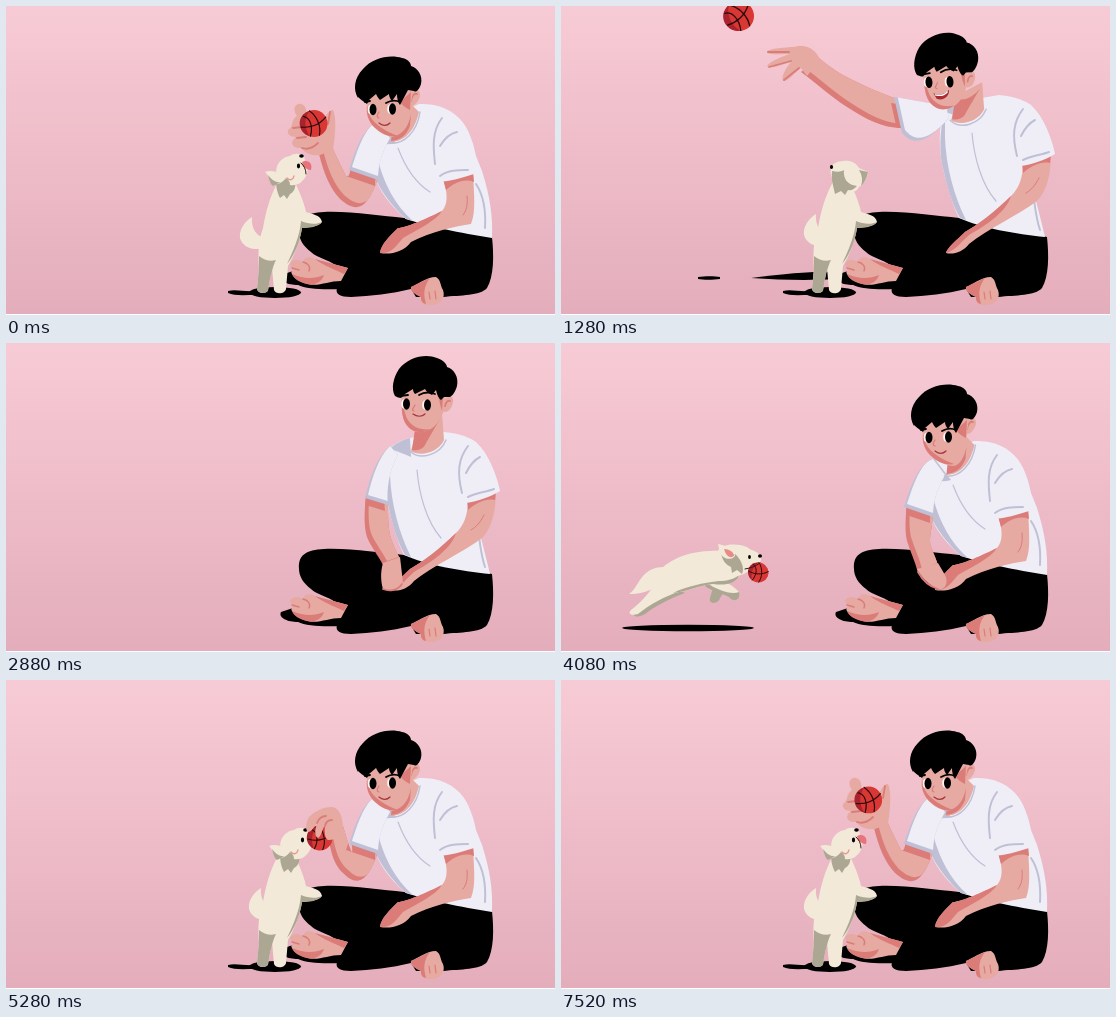
An HTML page with a canvas that plays this animation: 549x309 px, repeating every 7600 ms.

```html
<!DOCTYPE html>
<html lang="en">
<head>
<meta charset="utf-8">
<title>Fetch</title>
<style>
html, body { margin: 0; width: 100%; height: 100%; overflow: hidden; background: #fff }
canvas { display: block }
</style>
</head>
<body>
<canvas width="549" height="309"></canvas>
<script>
const LOOP = 7600, STEP = 80;
const SKIN = '#e6aaa2', BLUSH = '#db7c79', SHIRT = '#efeef7', FOLD = '#bfc0d5';
const FUR = '#f3e9d8', FUR_SHADE = '#aca793', INK = '#000', RED = '#d93733';
const c = document.querySelector('canvas').getContext('2d');

const fill = (path, color) => { c.fillStyle = color; c.fill(new Path2D(path)); };
const line = (path, color, width) => {
  c.strokeStyle = color; c.lineWidth = width; c.lineCap = 'round'; c.stroke(new Path2D(path));
};
const oval = (x, y, rx, ry, color) => {
  c.fillStyle = color; c.beginPath(); c.ellipse(x, y, rx, ry, 0, 0, 7); c.fill();
};
const within = (path, draw) => {
  c.save(); c.clip(new Path2D(path)); draw(); c.restore();
};
// Draws with the pivot (px, py) moved by (dx, dy) and turned; flip -1 mirrors.
const at = (dx, dy, draw, turn = 0, px = 0, py = 0, flip = 1) => {
  c.save();
  c.translate(px + dx, py + dy); c.rotate(turn); c.scale(flip, 1); c.translate(-px, -py);
  draw();
  c.restore();
};
// A shape lit from the upper right.
const lit = (path, color, shade, depth) => {
  fill(path, shade);
  within(path, () => at(depth, -depth, () => fill(path, color)));
};

const NUM = /-?[\d.]+/g;
const mix = (a, b, k) => {
  const to = b.match(NUM);
  let i = 0;
  return a.replace(NUM, v => (+v + (to[i++] - v) * k).toFixed(2));
};
const span = (t, keys) => {
  let i = 0;
  while (i < keys.length - 2 && t >= keys[i + 1][0]) i++;
  const [a, b] = [keys[i], keys[i + 1]];
  const k = Math.min(1, Math.max(0, (t - a[0]) / (b[0] - a[0])));
  return [a[1], b[1], k];
};
const smooth = k => k * k * (3 - 2 * k);
const track = (t, keys, ease = smooth) => {
  const [a, b, k] = span(t, keys);
  return a + (b - a) * ease(k);
};

// Throwing arm: sleeve, arm outline and hand for each pose.
const bentSleeve = 'M372 116 C356 122 349 146 343 164 L372 174 C372 162 374 150 384 132Z';
const POSES = {
  hold: {
    sleeve: bentSleeve,
    arm: 'M345 160 C344 170 342 172 340 170 C336 162 331 152 327 143 L313 148 C318 168 324 182 334 193 C348 205 360 208 372 172Z',
    hand: 'M327 144 C329 132 331 112 327 104 C322 104 318 112 316 120 L300 112 C302 102 298 97 292 98 C287 100 288 106 291 110 C285 114 287 120 284 122 C279 126 283 131 290 131 C283 136 286 143 295 142 C300 148 306 150 314 149Z',
    crease: 'M287 122 L296 121 M291 132 L300 131 M296 142 C302 144 308 141 312 137 M322 118 L324 106'
  },
  wind: {
    sleeve: 'M384 97 C368 99 355 92 345 85 L335 118 C352 136 365 138 385 112Z',
    arm: 'M347 87 C340 84 336 80 338 74 C342 62 346 52 352 42 L336 36 C326 52 318 66 316 80 C316 98 326 110 338 116Z'
  },
  cast: {
    sleeve: 'M384 97 C368 99 350 93 333 91 L341 127 C352 140 365 138 388 112Z',
    arm: 'M336 93 C322 88 308 82 298 77 C282 70 270 62 258 52 L240 66 C256 78 272 92 286 101 C304 113 322 122 340 122Z',
    hand: 'M259 54 C256 45 248 39 238 40 C228 42 215 41 206 45 C206 50 218 48 228 48 C218 52 208 56 206 60 C210 64 222 58 230 56 C225 62 220 70 222 75 C227 76 234 66 240 62 L246 70Z',
    crease: 'M207 46 L228 46 M208 61 L230 55 M223 74 L238 62'
  },
  lap: {
    sleeve: 'M384 103 C370 115 364 135 359 155 L382 162 C380 145 384 125 392 112Z',
    arm: 'M360 153 C358 170 358 185 361 194 C365 204 372 212 377 222 L394 216 C390 208 386 200 384 192 C382 180 382 172 382 160Z',
    hand: 'M377 220 C374 230 375 240 377 246 C384 249 394 246 397 240 L394 214Z',
    crease: 'M377 246 C384 249 392 247 396 241'
  },
  low: {
    sleeve: bentSleeve,
    arm: 'M346 160 C344 178 344 190 346 198 C349 208 354 218 357 230 L377 222 C374 212 370 206 369 199 C369 190 371 186 372 172Z',
    hand: 'M356 226 C360 234 368 242 376 246 C384 248 388 240 384 232 L377 220Z',
    crease: 'M357 229 C362 238 370 244 377 246'
  },
  grip: {
    sleeve: bentSleeve,
    arm: 'M345 160 C347 172 347 174 345 171 C342 163 340 156 337 146 L323 160 C325 174 329 186 337 193 C348 204 360 208 372 172Z',
    hand: 'M337 148 C337 138 334 128 326 127 C316 127 308 132 303 137 C300 142 299 150 302 152 C306 152 308 146 311 144 C309 150 308 156 312 158 C316 156 316 148 319 146 C318 152 319 160 323 160 C330 160 336 156 337 148Z',
    crease: 'M311 143 C313 138 317 136 320 136 M319 146 C320 141 324 140 326 140'
  }
};
Object.assign(POSES.wind, {
  hand: POSES.hold.hand, crease: POSES.hold.crease, home: POSES.hold.arm
});
const ARM_KEYS = [[0, 'hold'], [400, 'hold'], [720, 'wind'], [1040, 'wind'], [1200, 'cast'],
  [1600, 'cast'], [2080, 'lap'], [3680, 'lap'], [4080, 'low'], [4480, 'low'], [4880, 'grip'],
  [6480, 'grip'], [7120, 'hold'], [LOOP, 'hold']];
const wrist = arm => {
  const n = arm.match(NUM).map(Number);
  return [(n[12] + n[14]) / 2, (n[13] + n[15]) / 2];
};

function ball(x, y, turn = 0, r = 15) {
  at(x, y, () => {
    c.scale(r / 15, r / 15);
    oval(0, 0, 15, 15, RED);
    fill('M-5 -14 C-20 -10 -19 10 -5 14 C-11 4 -11 -6 -5 -14Z', '#a8232e');
    line('M-14 4 C-5 5 6 2 13 -7 M-5 -14 C4 -8 8 4 6 13 M-12 -8 C-4 -7 -1 4 -4 14', '#25080b', 1.3);
  }, turn);
}

function legs() {
  fill('M275 269 C272 275 282 279 292 279 C300 283 318 284 334 283 L340 270 L290 264Z', INK);
  fill('M293 226 C292 212 300 207 318 206 C345 205 375 210 398 212 L486 231 C488 250 488 270 481 282 C474 290 455 289 437 291 L410 291 L405 283 C385 288 365 290 345 291 C334 291 329 288 331 282 L337 266 C330 255 312 253 305 246 C297 240 293 233 293 226Z', INK);
  fill('M284 258 C286 253 292 253 297 256 C298 251 304 250 309 253 C318 257 330 258 342 262 L335 275 C322 275 312 281 302 278 C293 276 288 272 286 268 C284 265 288 264 286 262Z', SKIN);
  fill('M309 253 L342 262 L338 268 C328 263 318 260 309 253Z M286 268 C298 273 308 273 318 269 C316 276 308 280 301 278 C293 276 288 273 286 268Z', BLUSH);
  line('M286 262 L293 264 M297 256 C302 257 305 261 303 265', BLUSH, 1.4);
  fill('M405 281 C411 279 420 271 430 271 C435 274 434 279 437 284 C440 292 434 299 426 299 C417 300 414 296 415 291 C408 288 404 284 405 281Z', SKIN);
  fill('M405 281 L424 272 C418 280 417 287 420 298 C414 297 415 291 415 291 C408 288 405 285 405 281Z', BLUSH);
  line('M423 286 L424 293 M429 285 L430 293', BLUSH, 1.2);
}

function torso(lean) {
  const m = (up, down) => mix(up, down, lean);
  fill(m('M404 95 C395 97 388 101 383 106 C377 122 378 145 382 162 C386 180 392 200 398 212 C420 222 455 228 484 231 C479 210 474 190 468 170 L462 158 C475 156 487 152 492 146 C490 132 484 112 470 99 C460 92 448 90 438 89Z',
    'M372 116 C366 119 363 122 360 127 C358 142 362 160 370 174 C376 190 390 205 400 213 C420 220 455 227 486 232 C487 210 484 190 476 165 L470 150 C470 150 468 140 466 135 C462 122 455 110 440 103 C432 99 424 98 413 98Z'), SHIRT);
  fill(m('M384 105 C378 125 378 150 383 166 C387 185 393 202 399 212 L405 214 C393 190 385 160 384 132Z',
    'M366 120 C361 140 364 160 371 176 C378 190 390 204 400 213 L407 215 C390 200 377 178 370 146Z'), FOLD);
  fill(m('M404 95 C396 97 388 101 384 106 C390 108 396 110 405 114Z',
    'M373 115 C367 118 362 122 360 130 C368 138 380 140 390 137 L384 128Z'), FOLD);
  line(m('M411 127 C413 150 420 178 435 195', 'M392 142 C398 158 408 176 424 186'), FOLD, 1.2);
  line(m('M470 176 C474 195 474 210 479 224', 'M470 178 C478 190 480 205 479 222'), FOLD, 2);
}

function restingArm(lean) {
  const m = (up, down) => mix(up, down, lean);
  fill(m('M462 156 C462 172 458 182 450 190 C435 205 415 220 404 226 C396 235 386 242 385 247 C392 249 402 246 408 238 C426 223 458 209 476 195 C487 184 490 165 490 147Z',
    'M437 173 C442 188 442 198 436 205 C422 212 400 222 392 222 C384 230 375 238 374 247 C384 249 398 246 405 236 C424 226 450 220 465 218 C470 205 468 190 467 166Z'), SKIN);
  fill(m('M461 156 L490 147 L489 157 C480 155 470 160 462 167Z', 'M437 173 L467 166 L468 176 C458 172 448 177 440 184Z'), BLUSH);
  fill(m('M450 190 C435 205 415 220 404 226 C394 235 386 242 385 247 C394 245 400 236 408 229 C426 219 446 205 450 190Z',
    'M436 205 C422 212 400 222 392 222 C384 230 375 238 374 247 C386 248 390 240 397 232 C412 223 430 215 436 205Z'), BLUSH);
  line(m('M478 172 C474 180 470 184 465 187', 'M461 190 C462 200 460 205 457 209'), BLUSH, 1);
  fill(m('M465 98 C455 115 455 140 460 160 C472 158 484 154 494 148 C490 130 482 108 465 98Z',
    'M440 104 C426 120 427 150 433 176 C444 175 456 172 468 168 C468 150 462 118 440 104Z'), SHIRT);
  line(m('M462 103 C452 116 451 130 456 150 M460 130 C465 120 470 116 474 114 M462 154 C470 150 480 149 488 146',
    'M436 112 C426 125 427 140 429 158 M434 140 C440 130 446 127 451 126 M434 170 C442 164 452 164 462 164'), FOLD, 2);
}

function head(t, lean) {
  const m = (up, down) => mix(up, down, lean);
  const dx = track(t, [[320, 0], [720, -8], [1040, -8], [1200, -33], [1600, -33], [2080, 0], [3680, 0], [4080, 1], [4400, 0]]);
  const dy = track(t, [[320, 0], [720, 4], [1040, 4], [1200, 14], [1600, 14], [2080, 0], [3680, 0], [4080, -9], [4400, 0]]);
  const turn = track(t, [[1040, 0], [1200, -.07], [1600, -.07], [2080, 0]]);
  at(dx * .45, dy * .45, () => {
    fill(m('M409 84 C410 94 406 102 405 108 C414 114 432 110 438 97 L436 70Z', 'M386 126 C388 132 386 134 384 136 C396 136 408 128 413 106 L405 98Z'), SKIN);
    fill(m('M409 86 C418 90 428 84 434 76 L420 100 C418 106 412 108 406 107Z', 'M386 126 C396 130 402 122 405 108 L404 120 C400 130 394 134 385 135Z'), BLUSH);
    line(m('M404 108 C414 118 434 112 440 97', 'M383 137 C398 139 411 126 414 106'), FOLD, 1.5);
  });
  at(dx, dy, () => {
    fill(m('M437 58 C442 51 448 52 447 59 C446 66 441 71 436 68Z', 'M403 88 C408 81 415 83 414 90 C412 97 407 102 402 99Z'), SKIN);
    line(m('M439 63 C440 58 443 57 444 58', 'M405 95 C406 89 409 87 411 88'), BLUSH, 1.8);
    fill(m('M396 50 C394 60 396 72 399 80 C403 86 409 90 416 89 C426 88 433 80 437 70 L440 50 L415 38Z', 'M361 88 C360 98 361 108 364 116 C369 124 378 130 387 131 C398 128 404 118 404 106 L407 84 L380 75Z'), SKIN);
    fill(m('M396 60 C395 72 398 82 406 87 C412 90 418 90 424 86 C412 88 402 82 399 70Z', 'M361 100 C360 108 362 114 368 121 C376 128 384 132 392 130 C380 126 368 118 364 110Z'), BLUSH);
    fill(m('M433 52 L437 54 L436 68 C434 62 433 58 433 52Z', 'M394 96 L405 86 L404 104 C400 102 397 100 394 96Z'), BLUSH);
    fill(m('M389 53 C385 46 387 35 393 26 C402 14 420 10 431 15 C438 17 441 22 441 24 C448 26 453 34 451 43 C449 50 446 53 444 54 L438 54 L435 57 C432 55 431 51 430 47 L426 52 C422 50 420 48 419 46 L409 51 C408 50 407 48 407 46 L399 51 L395 55 C393 55 391 54 389 53Z',
      'M352 92 C347 84 348 72 357 63 C366 52 384 48 396 52 C403 53 405 58 405 60 C412 62 417 70 415 78 C413 84 410 87 408 85 L402 84 L394 99 C392 97 391 92 391 88 L386 95 C384 93 383 90 383 88 L374 94 C372 92 371 90 370 88 L363 94 L361 98 C357 95 354 93 352 91Z'), INK);
    line(m('M394 53 L402 52 M413 52 C418 49 424 49 429 51', 'M359 96 L364 95 M380 97 C385 94 390 94 394 96'), INK, 1.8);
    const lid = track(t, [[2880, 1], [2960, .35], [3040, .1], [3120, 1]]);
    for (const [ux, uy, x, y] of [[400.5, 61, 367, 103.5], [421.5, 62, 386.5, 103]]) {
      const ex = ux + (x - ux) * lean, ey = uy + (y - uy) * lean;
      oval(ex - 2, ey, 3.3, 4.8 * lid, '#fff5ee');
      oval(ex, ey, 3.5, 5.8 * lid, INK);
    }
    line(m('M409 62 C407 66 405 67 408 68', 'M373 106 C371 109 370 111 373 112'), BLUSH, 1.2);
    if (t >= 1120 && t < 1760) {
      fill('M404 72 C410 76 416 74 420 70 C420 77 413 81 407 78Z', '#a92c34');
      line('M406 74 C412 76 416 74 418 72', '#fff', 1.3);
    } else line(m('M407 71 C411 74 416 74 419 71', 'M373 117 C377 120 381 120 384 117'), '#a5343c', 1.2);
  }, turn, 418, 55);
}

function dogHead(biting) {
  fill('M271 171 C269 179 271 186 274 192 L278 189 L281 193 L284 188 C289 186 291 178 288 172Z', FUR_SHADE);
  fill('M271 170 C268 160 275 151 284 150 C288 147 294 147 297 150 C300 152 299 156 297 158 C301 160 303 166 300 170 C296 177 291 180 284 179 C284 172 277 170 271 170Z', FUR);
  fill('M259 166 C266 163 276 167 280 172 C276 178 268 180 264 176 C263 171 262 169 259 166Z', FUR);
  fill('M262 169 C266 174 270 177 275 176 L267 180 C264 178 263 173 262 169Z', FUR_SHADE);
  line('M281 172 C284 175 287 174 288 170', '#e49a90', 1.3);
  oval(295.5, 150, 2.3, 1.8, INK);
  oval(292.5, 160, 1.6, 2.4, INK);
  if (!biting) {
    fill('M296 156 C302 153 307 157 305 164 C302 164 299 162 297 160Z', '#e8737b');
    line('M295 157 C298 160 300 163 300 168', '#3a1518', 1);
  }
}

function dogHeadFromBehind() {
  fill('M270 163 C270 158 276 155 283 155 C290 154 295 157 298 162 L307 166 C306 173 302 179 298 181 C294 190 276 188 274 176 C270 172 269 167 270 163Z', FUR);
  fill('M271 165 C276 166 280 166 283 164 C282 172 286 179 296 180 C292 184 290 185 287 184 L284 189 L280 185 L274 188 C273 182 270 175 271 165Z M298 164 L307 166 C306 172 303 177 300 180 C302 174 301 169 298 164Z', FUR_SHADE);
  oval(270.5, 161, 1.6, 2, INK);
}

function standingDog(t, pull) {
  oval(269, 286.5, 26, 5.5, INK);
  fill('M222 285 C230 283 238 286 250 285 L250 289 C238 289 228 290 222 287Z', INK);
  const wide = t / STEP % 2;
  at(wide ? 0 : 9, wide ? 0 : -3, () =>
    fill('M246 211 C238 216 233 224 234 232 C237 242 248 245 258 242 L259 232 C250 230 245 222 246 211Z', FUR));
  fill('M272 176 C264 190 260 205 257 222 C252 235 252 250 253 262 L251 283 C252 288 260 288 262 284 L266 262 L268 284 C270 289 279 288 280 283 L282 260 C288 250 294 235 296 222 C304 221 312 221 316 216 C315 209 306 208 300 206 C298 195 292 183 288 174Z', FUR);
  fill('M253 250 C258 254 264 256 270 254 C266 262 264 272 262 285 C260 288 252 288 251 283 L253 262Z', FUR_SHADE);
  fill('M296 222 C303 222 312 221 316 216 C310 219 302 218 295 215 C294 230 287 245 281 258 C288 250 294 236 296 222Z', FUR_SHADE);
  const biting = t >= 4400 && t < 6480;
  if (t >= 960 && t < 1440) dogHeadFromBehind();
  else at(pull + (biting ? 4 : 0), 0, () => dogHead(biting));
}

function runningDog(t, x, flip, tilt) {
  const stride = Math.cos((t - 4080) / 320 * 2 * Math.PI) - 1;
  at(x - 137, 0, () => {
    oval(127, 285, 66 + stride * 8, 3.2, INK);
    at(0, -stride * 5, () => {
      at(0, 0, () => {
        fill('M154 238 L149 255 C147 262 158 261 159 255 L168 241Z', FUR_SHADE);
        fill('M148 236 C160 238 172 243 178 249 C180 257 173 260 168 254 C160 250 150 248 144 243Z', FUR_SHADE);
        fill('M150 234 C162 237 172 242 178 249 C170 252 156 247 146 240Z', FUR);
      }, -stride * .4, 150, 236);
      fill('M106 224 C92 223 84 228 77 240 C74 245 71 249 68 251 C80 252 96 245 106 238Z', FUR);
      at(0, 0, () => {
        fill('M104 240 C94 254 82 264 74 269 C70 274 78 275 84 271 C94 263 110 255 124 250Z', FUR_SHADE);
        fill('M98 232 C92 248 78 261 70 267 C66 271 71 273 77 271 C88 262 104 253 120 248Z', FUR);
      }, stride * .45, 108, 240);
      fill('M100 226 C112 214 132 208 150 208 C162 206 178 214 180 228 C178 238 165 243 152 241 C138 242 124 250 108 250 C98 246 96 236 100 226Z', FUR);
      fill('M158 238 C166 238 173 236 178 232 C176 240 165 243 152 241 C138 242 126 249 112 250 C126 243 142 240 158 238Z', FUR_SHADE);
      fill('M158 206 C162 201 176 200 186 204 C190 208 198 208 200 214 C201 220 196 224 190 225 C184 234 168 236 160 228 C154 222 154 212 158 206Z', FUR);
      fill('M160 210 C161 217 165 222 170 224 L171 230 L176 227 L181 231 C184 225 180 216 174 211Z', FUR_SHADE);
      fill('M157 201 C163 202 174 206 174 213 C170 218 162 216 159 210Z', FUR);
      fill('M163 206 C168 206 173 209 173 213 C169 216 165 213 163 206Z', '#e88b87');
      if (flip > 0) ball(197.5, 229.5, .4, 10);
      oval(188.5, 214, 1.4, 2, INK);
      oval(199, 213, 2, 1.7, INK);
      line('M184 226 C190 225 195 223 199 220', '#3a1518', 1);
    }, tilt, 120, 250);
  }, 0, 137, 0, flip);
}

const sky = c.createLinearGradient(0, 0, 0, 308);
sky.addColorStop(0, '#f7cbd5');
sky.addColorStop(1, '#e4adbb');

function draw(t) {
  c.fillStyle = '#fff'; c.fillRect(0, 0, 549, 309);
  c.fillStyle = sky; c.fillRect(0, 0, 549, 308);

  const lean = track(t, [[320, 1], [720, 0], [3680, 0], [4080, 1]]);
  const [from, to, raw] = span(t, ARM_KEYS);
  const k = smooth(raw), a = POSES[from], b = POSES[to];
  const arm = mix(a.arm, b.arm, k), sleeve = mix(a.sleeve, b.sleeve, k);
  const pose = k > .5 ? b : a;
  const [wx, wy] = wrist(arm), [hx, hy] = wrist(pose.home || pose.arm);
  const tug = t >= 5280 && t < 6480 ? 4 * Math.sin((t - 5280) / 200 * Math.PI) : 0;
  const lift = track(t, [[6880, 0], [7120, -12], [7440, 0]]);

  const reach = track(t, [[1040, 0], [1200, 1], [1600, 1], [1840, 0]]);
  if (reach > 0) fill(`M${285 - 95 * reach} 272 C230 267 255 265 272 266 L300 272 C270 274 230 275 ${285 - 95 * reach} 272Z`, INK);
  legs();
  torso(lean);
  at(tug, lift, () => {
    lit(arm, SKIN, BLUSH, 4);
    within(arm, () => at(-3, 6, () => fill(sleeve, BLUSH)));
  });
  lit(sleeve, SHIRT, FOLD, 3);
  restingArm(lean);
  head(t, lean);

  if (t >= 1440 && t < 2160) runningDog(t, track(t, [[1440, 240], [2080, -90]], v => v), -1, 0);
  else if (t >= 3680 && t < 4400) {
    runningDog(t, track(t, [[3680, -110], [4080, 137], [4400, 250]], v => v), 1, track(t, [[4160, 0], [4400, -.9]]));
  } else if (t < 1440 || t >= 4400) standingDog(t, tug);

  const flight = t - 1200;
  const drawHand = () => at(wx - hx + tug, wy - hy + lift, () => {
    fill(pose.hand, SKIN);
    line(pose.crease, BLUSH, 1.8);
  });
  const gripping = pose === POSES.grip || pose === POSES.low;
  if (!gripping) drawHand();
  if (flight < 0) ball(wx - 12, wy - 28, 0, 13.5);
  else if (flight < 560) {
    const x = 222 - .55 * flight;
    ball(x, 38 - .35 * flight, -flight / 200);
    fill(`M${x - 41} 271 C${x - 34} 270 ${x - 24} 270 ${x - 19} 271 L${x - 19} 273 C${x - 26} 274 ${x - 36} 274 ${x - 41} 273Z`, INK);
  } else if (t >= 4400 && t < 6480) ball(314 + tug, 158, .2, 12.5);
  else if (t >= 6480) ball(wx - 16 + 4 * k, wy + 5 - 33 * k + lift, 0, 12.5 + k);
  if (gripping) drawHand();
}

function frame() {
  const t = performance.now() % LOOP;
  draw(t < 40 ? LOOP : Math.floor(t / STEP) * STEP);
  requestAnimationFrame(frame);
}
frame();
</script>
</body>
</html>
```
